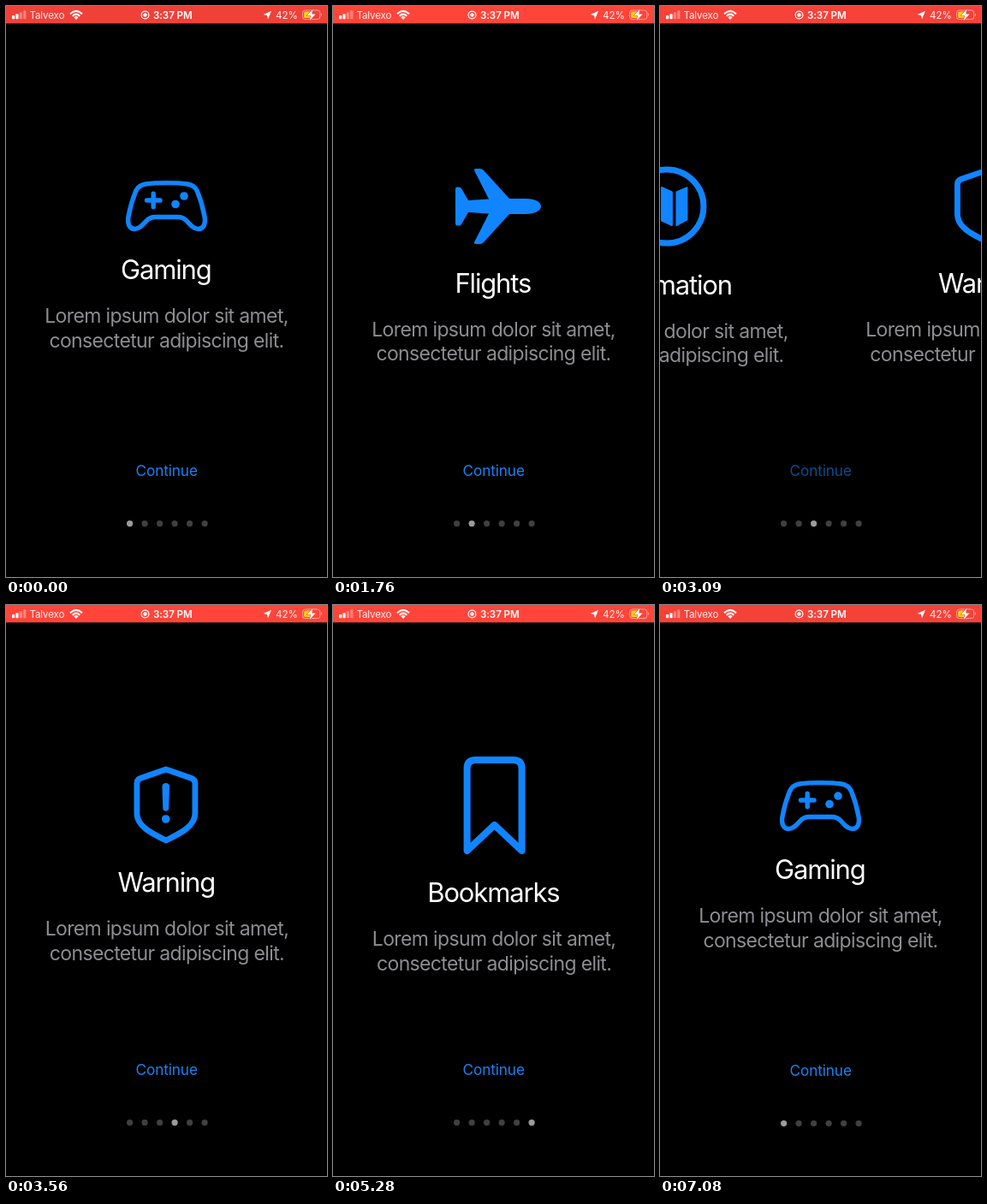
Animation of 375 by 667 pixels, one loop 7.18 s. Source, as an HTML page:

```html
<!DOCTYPE html>
<html lang="en">
<head>
<meta charset="utf-8">
<title>Onboarding</title>
<style>
html, body { margin: 0; width: 100%; height: 100%; overflow: hidden; background: #000; }
svg { display: block; width: 100%; height: 100%; font-family: Inter, Roboto, sans-serif; font-optical-sizing: none; }
.title { font-size: 31px; letter-spacing: -1.15px; fill: #fff; text-anchor: middle; }
.body { font-size: 23px; letter-spacing: -.64px; fill: #8d8d92; text-anchor: middle; }
.status { font-size: 11.6px; fill: #fff; }
.fill { fill: #1085ff; }
.line { fill: none; stroke: #1085ff; stroke-linecap: round; stroke-linejoin: round; }
#button { font-size: 17.2px; letter-spacing: -.1px; fill: #1a82f5; text-anchor: middle; }
</style>
</head>
<body>
<svg viewBox="0 0 375 667">
  <rect width="375" height="667"/>
  <g id="sheet">
    <g id="pages">
      <g>
        <path class="line" stroke-width="5.4" d="M163 208C176 206.2 199 206.2 212 208C218 209 221 211 223.3 216C227 225 230 235 232 246C233.5 255 230.5 260.5 224.5 260.5C219.5 260.5 215.5 256 211.5 251.5C208.5 248 205.5 246.5 200.5 246.5H174.5C169.5 246.5 166.5 248 163.5 251.5C159.5 256 155.5 260.5 150.5 260.5C144.5 260.5 141.5 255 143 246C145 235 148 225 151.7 216C154 211 157 209 163 208Z"/>
        <path class="line" stroke-width="5.4" d="M164.5 227H180M172.2 219.3V234.7"/>
        <circle class="fill" cx="208" cy="222" r="4.8"/>
        <circle class="fill" cx="198" cy="231.5" r="4.8"/>
      </g>
      <g>
        <path class="fill" d="M206 225H225C237 225 243 229.5 243 234C243 238.5 237 243 225 243H206L176 276Q174 278 172 278H167Q164 278 165.5 275L182 242.5L158 241L150 255Q149 256.5 147 256.5H145Q143 256.5 143 254.5V213.5Q143 211.5 145 211.5H147Q149 211.5 150 213L158 227L182 225.5L165.5 193Q164 190 167 190H172Q174 190 176 192Z"/>
      </g>
      <g>
        <circle class="line" stroke-width="7" cx="188" cy="234" r="43"/>
        <path class="fill" stroke="#1085ff" stroke-width="2" stroke-linejoin="round" d="M164.3 216.5L176.3 211.5V250L164.3 255.5ZM182 212L194 217.5V256L182 250.5ZM199.5 217.5L211.5 212.2V249.5L199.5 256Z"/>
      </g>
      <g>
        <path class="line" stroke-width="6.8" d="M186.5 192L157 202.3Q152.5 204 152.5 208.5V243C152.5 258 168 266 186.5 275C205 266 220.5 258 220.5 243V208.5Q220.5 204 216 202.3Z"/>
        <path class="fill" d="M182 212C182 206.5 190.6 206.5 190.6 212L189.7 238C189.5 241.5 183.1 241.5 182.9 238Z"/>
        <circle class="fill" cx="186.3" cy="250" r="4.8"/>
      </g>
      <g>
        <path class="line" stroke-width="6.4" d="M150 261H226C230 261 229.5 257 227 254C218 246 215 240 214 228C213 213 210 202 198.5 197.5C196.5 192 193 189 188 189C183 189 179.5 192 177.5 197.5C166 202 163 213 162 228C161 240 158 246 149 254C146.5 257 146 261 150 261Z"/>
        <path class="line" stroke-width="6.4" d="M174 263C174 273 180 278 188 278S202 273 202 263"/>
      </g>
      <g>
        <path class="line" stroke-width="8" d="M156 287V191Q156 181 166 181H210Q220 181 220 191V287L188 257Z"/>
      </g>
    </g>
    <text id="button" x="187.7" y="549">Continue</text>
    <g id="dots"></g>
  </g>
  <rect id="bar" width="375" height="20.4"/>
  <g class="status">
    <g fill="#fff">
      <rect x="7" y="11" width="3.2" height="4.2" rx=".8"/>
      <rect x="11.4" y="9.2" width="3.2" height="6" rx=".8"/>
      <g opacity=".35">
        <rect x="15.8" y="7.2" width="3.2" height="8" rx=".8"/>
        <rect x="20.2" y="5.2" width="3.2" height="10" rx=".8"/>
      </g>
    </g>
    <text x="27.5" y="14.7" letter-spacing="-.15" opacity=".92">Talvexo</text>
    <g fill="none" stroke="#fff" stroke-width="2">
      <path d="M75 9.2Q82 2.6 89 9.2M77.7 11.7Q82 7.6 86.3 11.7"/>
      <path fill="#fff" stroke="none" d="M79.4 13.2Q82 11 84.6 13.2L82 16Z"/>
      <circle cx="162.5" cy="10.5" r="4.4" stroke-width="1.2"/>
      <circle cx="162.5" cy="10.5" r="2.2" fill="#fff" stroke="none"/>
    </g>
    <text x="172" y="14.7" font-weight="600" letter-spacing="-.1">3:37 PM</text>
    <path fill="#fff" d="M310 5.8L306 15.4L305 11L300.6 10Z"/>
    <text x="315" y="14.7" opacity=".92">42%</text>
    <rect x="346.6" y="5" width="20.2" height="10.6" rx="3" fill="none" stroke="#fff" stroke-opacity=".5"/>
    <path d="M368 8.6Q370 10.3 368 12Z" fill="#fff" opacity=".5"/>
    <rect x="348.2" y="6.6" width="8" height="7.4" rx="1.5" fill="#ffd60a"/>
    <path id="bolt" d="M358.6 3.6L351.8 11H356.2L354.8 17L361.6 9.4H357.2Z" fill="#fff" stroke-width="1.1" paint-order="stroke"/>
  </g>
</svg>
<script>
const LOOP = 7180;
const PAGE_WIDTH = 375, HEIGHT = 667;
const TITLES = ["Gaming", "Flights", "Information", "Warning", "Notifications", "Bookmarks"];
const DROPS = [0, 15.5, 17.8, 16.4, 18.8, 28.3];
const SLIDES = [850, 2080, 2990, 3930, 4735];
const DISMISS = 6178, PRESENT = 6620;
const PRESS = 80, FADE = 250;

const byId = id => document.getElementById(id);
const clamp = (v, lo = 0, hi = 1) => Math.min(hi, Math.max(lo, v));

function add(parent, tag, attrs, text = "") {
  const node = document.createElementNS(parent.namespaceURI, tag);
  for (const name in attrs) node.setAttribute(name, attrs[name]);
  node.textContent = text;
  parent.append(node);
  return node;
}

const pages = [...byId("pages").children];
pages.forEach((page, i) => {
  const line = (cls, x, y, text) => add(page, "text", { class: cls, x, y: y + DROPS[i] }, text);
  line("title", 186.8, 319, TITLES[i]);
  line("body", 187.5, 370, "Lorem ipsum dolor sit amet,");
  line("body", 187.5, 398.6, "consectetur adipiscing elit.");
});
const dots = TITLES.map((_, i) => add(byId("dots"), "circle", { cx: 144.6 + 17.5 * i, cy: 604.6, r: 3.6 }));

// Critically damped spring from 0 to 1
function spring(ms, rate) {
  const x = Math.max(0, ms) / 1000 * rate;
  return 1 - (1 + x) * Math.exp(-x);
}

function buttonOpacity(t) {
  let opacity = 1;
  for (const tap of [...SLIDES, DISMISS]) {
    if (t >= tap - PRESS) opacity = 0.3 + 0.7 * clamp((t - tap) / FADE);
  }
  return opacity;
}

function barColor(t) {
  const wave = -Math.sin(Math.PI * t / 1000);
  const red = clamp(239 + (wave > 0 ? 24 : 21) * wave, 0, 255);
  const k = (red - 219) / 36;
  return `rgb(${red},${59 + 10 * k},${53 + 5 * k})`;
}

function draw(t) {
  const restarted = t >= PRESENT;
  const scroll = restarted ? 0 : SLIDES.reduce((sum, start) => sum + spring(t - start, 16), 0);
  const drop = restarted ? 1 - spring(t - PRESENT, 19) : spring(t - DISMISS, 19);

  byId("sheet").setAttribute("transform", `translate(0 ${drop * HEIGHT})`);
  pages.forEach((page, i) => {
    page.setAttribute("transform", `translate(${(i - scroll) * PAGE_WIDTH} 0)`);
  });
  const current = Math.round(scroll);
  dots.forEach((dot, i) => dot.setAttribute("fill", i === current ? "#9c9c9e" : "#404042"));
  byId("button").setAttribute("opacity", buttonOpacity(t));

  const color = barColor(t);
  byId("bar").setAttribute("fill", color);
  byId("bolt").setAttribute("stroke", color);
}

const origin = performance.now();
function tick() {
  draw((performance.now() - origin) % LOOP);
  requestAnimationFrame(tick);
}
tick();
</script>
</body>
</html>
```
